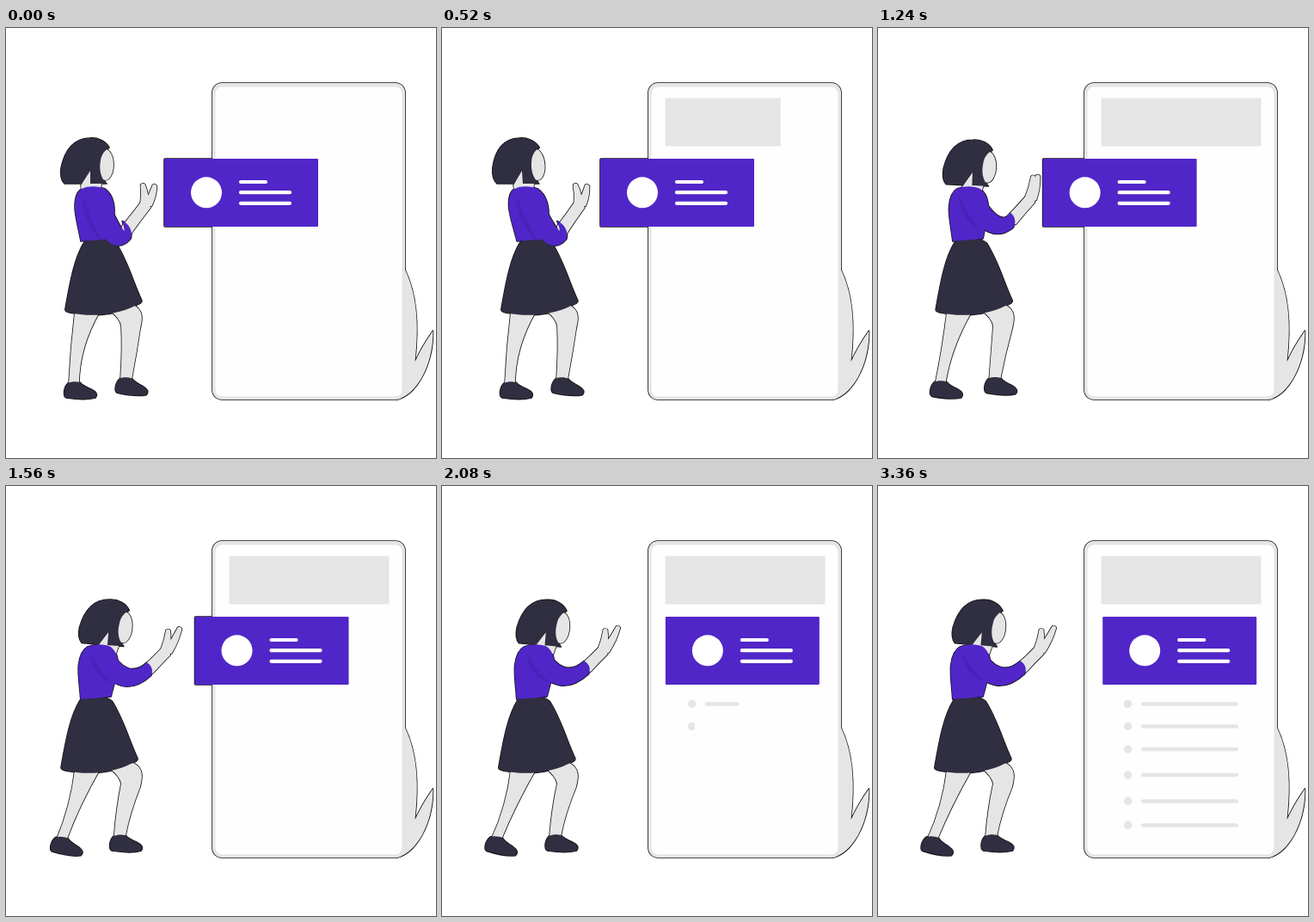
These frames come from a looping animation (500 px wide and 500 px high, 3920 ms). An HTML page:

```html
<!DOCTYPE html>
<html lang="en">
<head>
<meta charset="utf-8">
<title>Card placement</title>
<style>
  html, body { margin: 0; width: 100%; height: 100%; overflow: hidden; background: #fff; }
  svg { display: block; width: 100vw; height: 100vh; }
  .outline { stroke: #111; stroke-width: 1.6; stroke-linejoin: round; }
  .dark { fill: #302e41; }
  .skin, .grey { fill: #e5e5e5; }
  .purple { fill: #5026c8; }
  .shade { fill: #4a22b9; }
  .paper { fill: #fefefe; }
</style>
</head>
<body>
<svg viewBox="0 0 500 500">
  <defs id="clips"></defs>
  <!-- The stroked copy underneath leaves one thin line around the joined silhouettes. -->
  <use href="#scene" class="outline"/>
  <g id="scene">
    <g class="grey">
      <path d="M455 432C476 427 497 394 496.500 352Q485 368 475.500 388C480 350 479 312 464 281L456 300Z"/>
      <rect x="240" y="64" width="224" height="368" rx="11"/>
    </g>
    <rect class="paper" x="243.500" y="68.500" width="217" height="360" rx="8"/>
    <rect id="header" class="grey" x="259.500" y="81.500" height="56"/>
    <g id="rows" class="grey"></g>
    <g id="card">
      <rect class="purple" x="184" y="152" width="179" height="79" rx="1"/>
      <circle cx="233" cy="191.300" r="18" fill="#fff"/>
      <path d="M273 179h29M273 191.200h57M273 203.800h57" stroke="#fff" stroke-width="4.200" stroke-linecap="round"/>
    </g>

    <path id="farLeg" class="skin"/>
    <path id="farShoe" class="dark" d="M-7 1C-3 -1 3 -1 7 0C10 4 15 6 20 8C26 11 28 14 25 18C18 20 4 20 -9 18C-13 16 -12 6 -7 1Z"/>
    <path id="nearLeg" class="skin"/>
    <use id="nearShoe" href="#farShoePath"/>
    <path id="skirt" class="dark" d="M91 249C100 244 120 243 128 250C142 272 148 296 158 317C158 320 155 321 150 323C126 335 96 336 74 331C70 330 68 329 69 326C74 298 79 268 91 249Z"/>
    <g id="upper">
      <g id="head">
        <path class="skin" d="M98 165L87 183L88 190H109L112 178L100 176Z"/>
        <ellipse class="skin" cx="115.500" cy="159" rx="9.500" ry="18"/>
        <path class="dark" d="M120 139C116 131 106 127 97 128C78 129 68 143 64 163C63 171 65 178 68 181H88L98 166V181H117C110 174 108 165 110 154C111 147 115 142 120 139Z"/>
      </g>
      <path id="torso" class="purple" d="M88 187C97 183 108 184 115 187C125 194 128 208 125 224L122 245L87 248C84 232 80 218 80 208C80 198 83 190 88 187Z"/>
      <path id="forearm" class="skin"/>
      <path id="thumb" class="skin"/>
      <path id="finger" class="skin"/>
      <path id="sleeve" class="purple"/>
      <path id="fold" class="shade"/>
    </g>
  </g>
</svg>
<script>
const LOOP = 3920, STEP = 40, END = 3360;
const $ = id => document.getElementById(id);
const set = (id, name, value) => $(id).setAttribute(name, value);
const lerp = (a, b, k) => a + (b - a) * k;
const ease = (t, from, to) => {
  const u = Math.min(1, Math.max(0, (t - from) / (to - from)));
  return (1 - Math.cos(Math.PI * u)) / 2;
};
const add = (parent, tag, attrs) => {
  const el = document.createElementNS('http://www.w3.org/2000/svg', tag);
  for (const key in attrs) el.setAttribute(key, attrs[key]);
  return parent.appendChild(el);
};

// Joints as x, y and, where needed, an angle or a width.
const waiting = {
  head: [0, 0, 0], shoulder: [103, 198], elbow: [127, 241], cuff: [140, 235, 23],
  palm: [163, 205], thumb: [159, 182], finger: [173, 183],
  far: [79, 412, 0], near: [139.5, 407, 4]
};
const touching = {
  head: [7.5, 1, 1.5], shoulder: [106, 197], elbow: [131, 230], cuff: [150, 229, 19],
  palm: [173, 202], thumb: [176.5, 175], finger: [178, 175],
  far: [76.5, 412, 0], near: [137.5, 407, 3]
};
const pushing = {
  head: [23.3, 4, 5], shoulder: [112, 197], elbow: [139, 221], cuff: [168, 211, 16],
  palm: [188, 191], thumb: [190, 167], finger: [205, 164],
  far: [63.5, 408, 9], near: [131.5, 406, 0]
};
const blend = (a, b, k) => Object.fromEntries(Object.keys(a).map(
  joint => [joint, a[joint].map((v, i) => lerp(v, b[joint][i], k))]));

const normal = (a, b) => {
  const dx = b[0] - a[0], dy = b[1] - a[1], len = Math.hypot(dx, dy);
  return [-dy / len, dx / len];
};
const shift = (p, n, d) => [p[0] + n[0] * d, p[1] + n[1] * d];
const middle = (a, b, bend = 0) =>
  shift([(a[0] + b[0]) / 2, (a[1] + b[1]) / 2], normal(a, b), bend);

// Tapered tube through three joints, with softly rounded ends.
function limb(a, m, b, widths) {
  const normals = [normal(a, m), normal(a, b), normal(m, b)];
  const side = s => [a, m, b].map((p, i) => shift(p, normals[i], s * widths[i] / 2));
  const curve = (p, q, r) =>
    `Q${[0, 1].map(i => 2 * q[i] - (p[i] + r[i]) / 2)} ${r}`;
  const [a1, m1, b1] = side(1), [a2, m2, b2] = side(-1);
  const cap = (w, p) => `A${w} ${w} 0 0 0 ${p}`;
  return `M${a1}${curve(a1, m1, b1)}${cap(widths[2] * 0.7, b2)}${curve(b2, m2, a2)}${cap(widths[0] * 0.7, a1)}Z`;
}

const farLeg = ([x, y]) =>
  `M80 330H109Q85 372 ${x + 6} ${y + 2}H${x - 6}Q75 372 80 330Z`;
const nearLeg = ([x, y]) =>
  `M120 328L148 322C160 328 159 338 156 350Q${x + 12} 380 ${x + 6.5} ${y + 2}` +
  `H${x - 6.5}Q${x - 4} 375 134 346Q132 337 120 328Z`;
const place = ([x, y, angle]) => `translate(${x} ${y}) rotate(${angle})`;
const skew = k => `matrix(1 0 ${-k} 1 ${k * 246} 0)`;

// Both shoes share one shape.
const shoe = $('farShoe').cloneNode();
shoe.id = 'nearShoe';
$('nearShoe').replaceWith(shoe);

const wipes = [253.5, 279.5, 306, 336, 366.5, 394.5].map((y, i) => {
  const clip = add($('clips'), 'clipPath', { id: 'wipe' + i });
  const row = add($('rows'), 'g', { 'clip-path': `url(#wipe${i})` });
  add(row, 'circle', { cx: 290.5, cy: y, r: 4.7 });
  add(row, 'rect', { x: 306, y: y - 2.2, width: 113, height: 4.4, rx: 2.2 });
  return add(clip, 'rect', { x: 285.5, y: y - 6, height: 12 });
});

function drawWoman(t) {
  const reach = blend(waiting, touching, ease(t, 600, 900));
  const pose = blend(reach, pushing, ease(t, 960, 1720));
  const { head, shoulder, elbow, cuff, palm } = pose;
  const lean = 0.063 * (ease(t, 580, 900) - ease(t, 0, 540));
  const sway = ease(t, 1200, 1560) - ease(t, 1560, 1920);

  set('farLeg', 'd', farLeg(pose.far));
  set('nearLeg', 'd', nearLeg(pose.near));
  set('farShoe', 'transform', place(pose.far));
  set('nearShoe', 'transform', place(pose.near));
  set('skirt', 'transform', `translate(${-0.13 * head[0] - 2 * sway})`);

  set('upper', 'transform', skew(lean));
  set('head', 'transform', `translate(${head[0]} ${head[1]}) rotate(${head[2]} 94 160)`);
  set('torso', 'transform', skew(head[0] * 0.0053));
  set('sleeve', 'd', limb(shoulder, elbow, cuff, [25, 22, cuff[2]]));
  set('forearm', 'd', limb(cuff, middle(cuff, palm), palm, [14, 13, 13]));
  for (const [id, dx] of [['thumb', -2], ['finger', 2]]) {
    const base = [palm[0] + dx, palm[1]];
    set(id, 'd', limb(base, middle(base, pose[id], 1), pose[id], [10, 8, 5]));
  }
  const top = [shoulder[0] - 13, shoulder[1] - 1], low = [elbow[0] - 16, elbow[1] + 6];
  set('fold', 'd', limb(top, middle(top, low, 4), low, [1, 5, 1]));
}

function draw(t) {
  drawWoman(t);
  set('card', 'transform', `translate(${77.2 * ease(t, 1000, 2180)})`);
  set('header', 'width', 186 * ease(t, 100, 750));
  wipes.forEach((wipe, i) => {
    const start = 1776 + i * 200;
    wipe.setAttribute('width', t >= END ? 135 : 134 * ease(t, start, start + 650));
  });
}

const begin = performance.now();
function tick() {
  const t = (performance.now() - begin) % LOOP;
  draw(Math.min(END, Math.floor(t / STEP) * STEP));
  requestAnimationFrame(tick);
}
tick();
</script>
</body>
</html>
```
